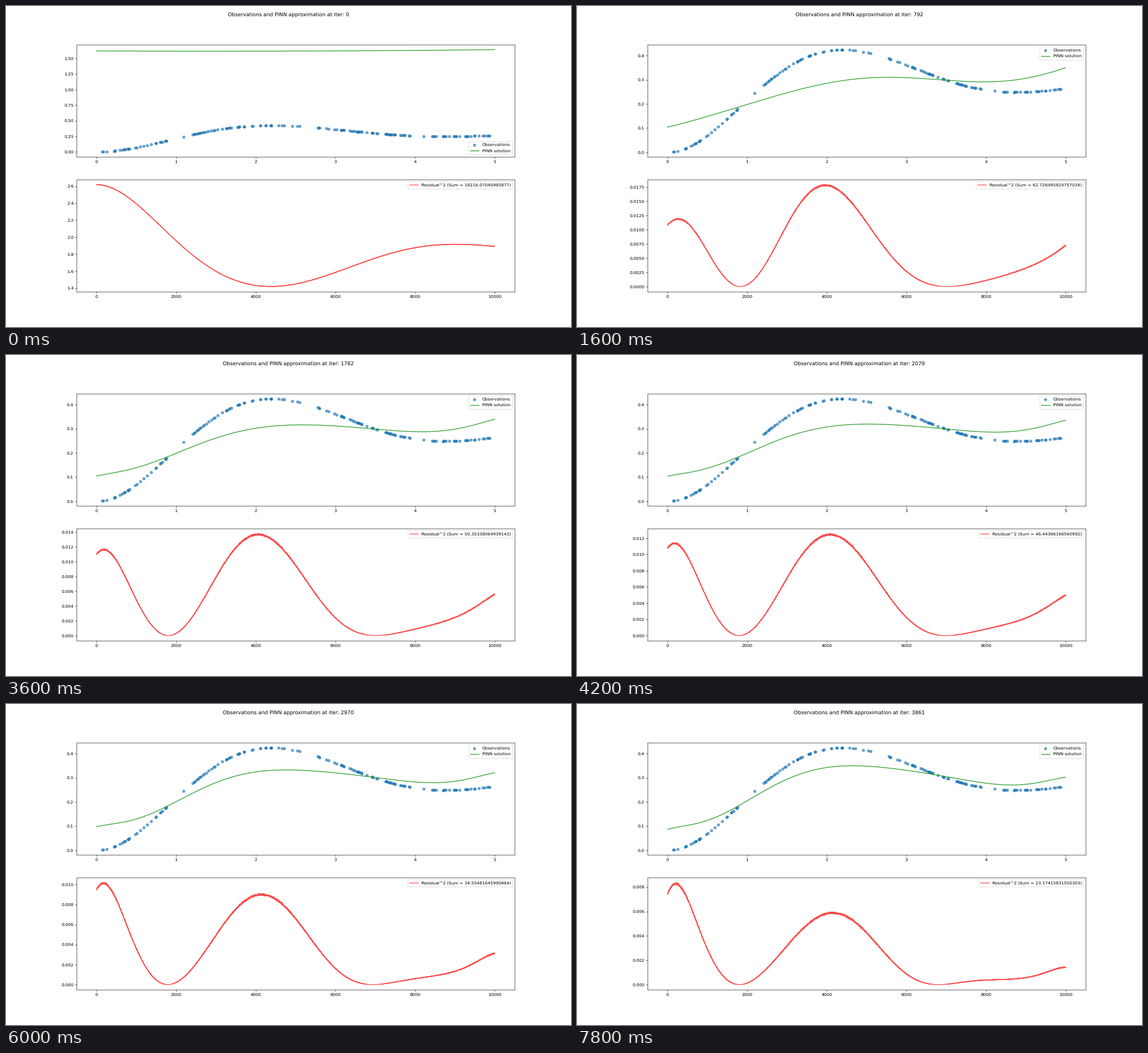
A matplotlib script that plays this animation: 993x564 px, repeating every 8000 ms.

```python
import matplotlib.pyplot as plt
import numpy as np
from matplotlib.animation import FuncAnimation
from numpy.polynomial import chebyshev as cheb

W, H, DPI = 993, 564, 53.9
FRAMES, STEP_MS, ITERS_PER_FRAME = 40, 200, 99
T_END, SAMPLES, NOISE = 5, 10000, 0.00025

plt.rcParams["font.family"] = "DejaVu Sans"
plt.rcParams["text.hinting"] = "none"
plt.rcParams["lines.linewidth"] = 1.7

rng = np.random.default_rng(7)


def oscillator(t, gain=0.3, damp=0.4, freq=1.428):
    """Step response of a damped oscillator."""
    swing = np.cos(freq * t) + damp / freq * np.sin(freq * t)
    return gain * (1 - np.exp(-damp * t) * swing)


def measure(t):
    return oscillator(t) + rng.normal(0, NOISE, len(t))


t = np.linspace(0, T_END, SAMPLES)
truth = measure(t)

# Random measuring times, apart from a few empty spans
GAPS = [(0.89, 1.04), (1.1, 1.2), (3.95, 4.09), (4.11, 4.19)]
obs_t = rng.uniform(0, 4.94, 165)
for lo, hi in GAPS:
    obs_t = obs_t[(obs_t < lo) | (obs_t > hi)]
obs_u = measure(obs_t)

# Network output on Chebyshev nodes, early, midway and late in the training
DEGREE = 8
x_nodes = -np.cos(np.pi * np.arange(DEGREE + 1) / DEGREE)
t_nodes = (x_nodes + 1) * T_END / 2
STAGES = [8, 25, 39]
SHAPES = np.array([
    [.104, .1195, .171, .250, .307, .299, .2955, .330, .350],
    [.1015, .112, .160, .2774, .3245, .3012, .284, .3134, .3292],
    [.086, .0995, .1555, .300, .348, .307, .2702, .2904, .3022]])
trend = np.polyfit(STAGES, SHAPES, 2)
untrained = 1.6186 - 0.00582 * t_nodes + 0.00202 * t_nodes ** 2


def network(k):
    trained = trend[0] * k * k + trend[1] * k + trend[2]
    nodes = trained + (untrained - trained) * np.exp(-4.5 * k)
    coef = cheb.chebfit(x_nodes, nodes, DEGREE)
    return cheb.chebval(2 * t / T_END - 1, coef)


fig, (top, bottom) = plt.subplots(
    2, 1, figsize=((W + 1e-6) / DPI, (H + 1e-6) / DPI), dpi=DPI)
title = fig.suptitle("")


def draw(k):
    u = network(k)
    residual = (u - truth) ** 2
    title.set_text("Observations and PINN approximation at iter: "
                   f"{k * ITERS_PER_FRAME}")

    top.clear()
    top.scatter(obs_t, obs_u, alpha=0.65, label="Observations")
    top.plot(t, u, color="tab:green", label="PINN solution")
    top.legend(loc="upper right" if k else "lower right")

    bottom.clear()
    bottom.plot(residual, color="red", alpha=0.7,
                label=f"Residual^2 (Sum = {float(residual.sum())})")
    bottom.legend(loc="upper right")
    return []


anim = FuncAnimation(fig, draw, frames=FRAMES, init_func=lambda: draw(0),
                     interval=STEP_MS, repeat=True, repeat_delay=0)
plt.show()
```
